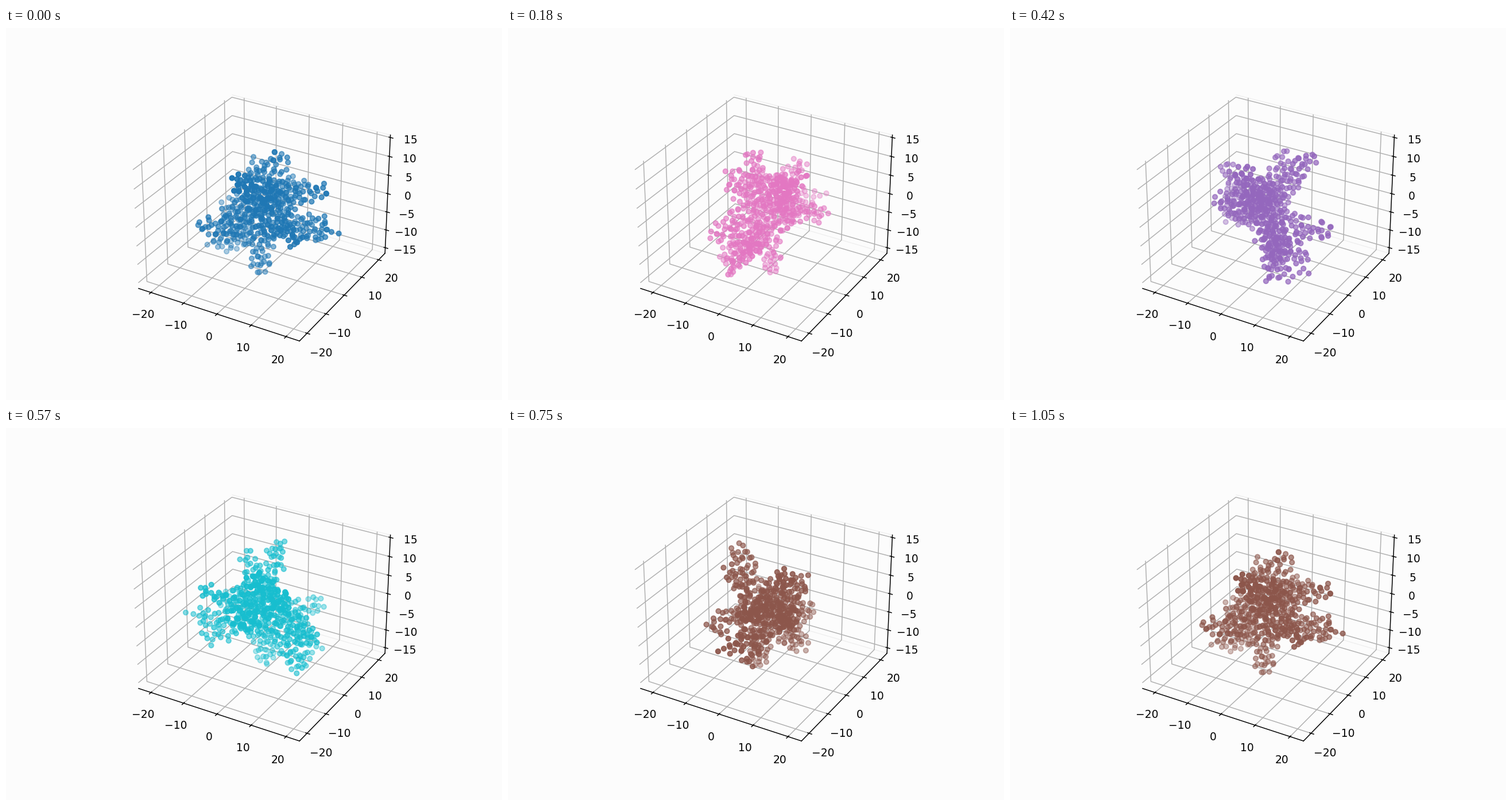
A matplotlib script that plays this animation: 864 px wide and 648 px high, repeating every 1.08 s.

```python
import matplotlib.pyplot as plt
import numpy as np
from matplotlib.animation import ArtistAnimation

FRAMES = 36
COUNT = 560
STEP = 2.0
BG = "#fcfcfc"

# Ends of the main arms: right of, behind and above the centre for the camera
ARMS = np.array([
    (19, -8, -2), (15, -2, 7), (15, -1, -6), (8, -12, -2), (9, 8, 3),
    (4, 6, 11), (2, -9, 10), (-8, -9, 13), (-2, 9, 7), (-16, -4, -3),
    (-10, 9, -4), (-15, 3, -11), (-10, 5, -14), (-7, 8, -12), (-1, -2, -14),
])


def arm(start, end, rng):
    """Wobbly chain of touching particles from start to end."""
    n = max(1, round(np.linalg.norm(end - start) / STEP))
    t = np.arange(1, n + 1)[:, None] / n
    wobble = rng.normal(0, 0.7, (n, 3)) * np.sin(np.pi * t)
    return start + (end - start) * t + wobble


def nearest(pts, p):
    return np.linalg.norm(pts - p, axis=1).min()


def grow(rng):
    """Aggregate: arms branching out from the core, then particles stuck on."""
    tree = np.zeros((1, 3))
    for end in sorted(ARMS, key=np.linalg.norm):
        # weighting the radius makes arms fork near the core
        cost = np.linalg.norm(tree - end, axis=1) + 0.8 * np.linalg.norm(tree, axis=1)
        tree = np.vstack([tree, arm(tree[cost.argmin()], end, rng)])

    pts = list(tree)
    for _ in range(40000):
        if len(pts) >= COUNT:
            break
        way = rng.normal(size=3)
        p = pts[rng.integers(len(pts))] + STEP * way / np.linalg.norm(way)
        reach = 5.5 - 0.2 * np.linalg.norm(p)
        if nearest(tree, p) < reach and nearest(np.array(pts), p) > 0.9 * STEP:
            pts.append(p)
    return np.array(pts)


def spin(pts, angle):
    c, s = np.cos(angle), np.sin(angle)
    x, y, z = pts.T
    return c * x - s * y, s * x + c * y, z


fig = plt.figure(figsize=(6.4, 4.8), dpi=135, facecolor=BG)
ax = fig.add_subplot(projection="3d", facecolor=BG)

cluster = grow(np.random.default_rng(7))
camera_turn = np.pi / 6
frames = [
    [ax.scatter(*spin(cluster, camera_turn + a), color=f"C{i % 10}")]
    for i, a in enumerate(np.linspace(0, 2 * np.pi, FRAMES))
]

ax.set_xticks(range(-20, 21, 10))
ax.set_yticks(range(-20, 21, 10))
ax.set_zticks(range(-15, 16, 5))
ax.set(xlim=(-23.85, 23.8), ylim=(-23.88, 23.88), zlim=(-16.58, 15.65))
for axis in (ax.xaxis, ax.yaxis, ax.zaxis):
    axis.set_pane_color((1, 1, 1, 0))
ax.yaxis.pane.set(alpha=None, facecolor="none", edgecolor="0.93", linewidth=0.6)

anim = ArtistAnimation(fig, frames, interval=30, repeat=True, repeat_delay=0)
plt.show()
```
